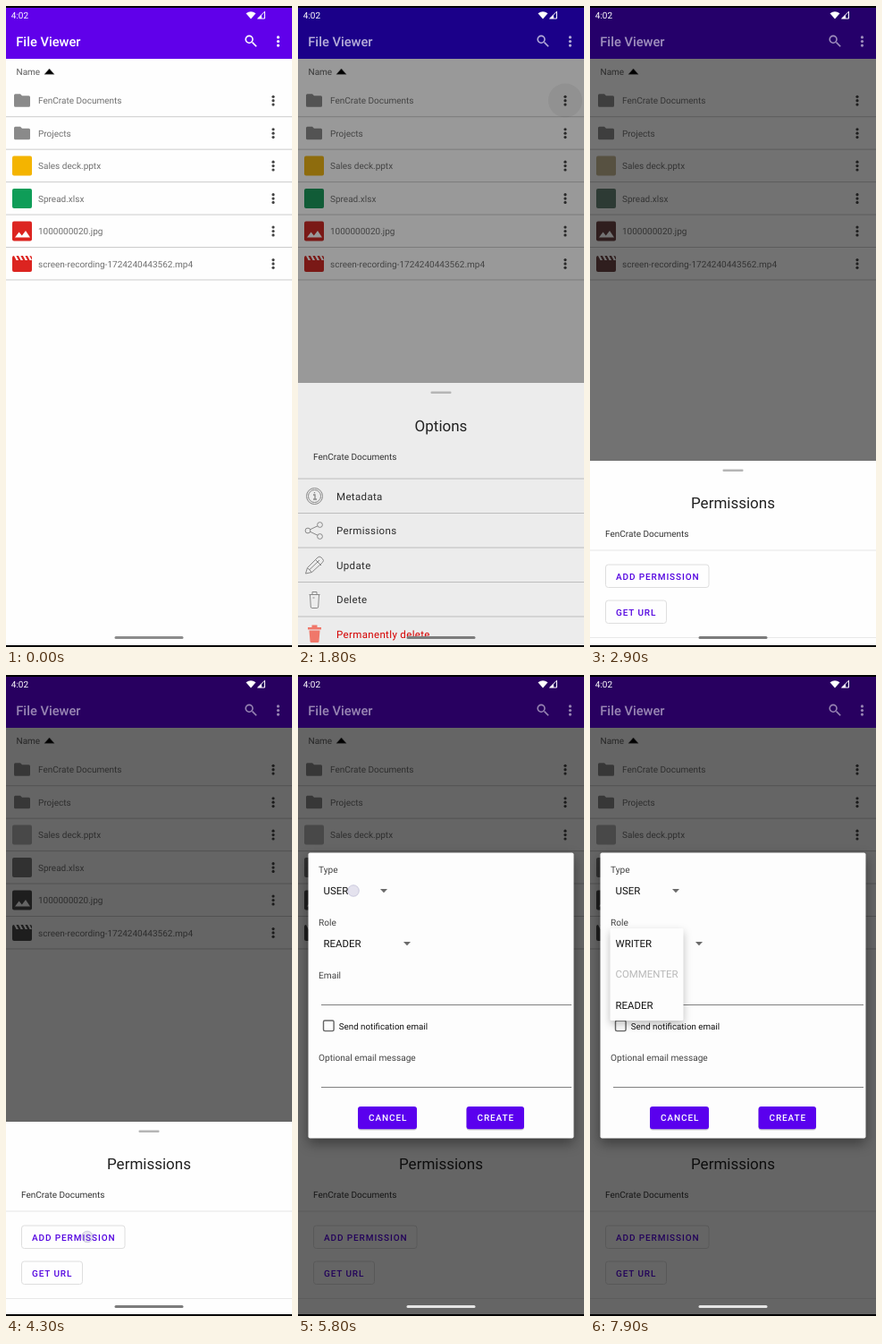
An HTML page that plays this animation: 320 px wide and 716 px high, repeating every 8000 ms.

```html
<!DOCTYPE html>
<html lang="en">
<head>
<meta charset="utf-8">
<title>File Viewer</title>
<style>
  html, body { margin: 0; width: 100%; height: 100%; overflow: hidden; background: #000; }
  svg { display: block; width: 100vw; height: 100vh; font-family: Roboto, "Noto Sans", sans-serif; text-rendering: geometricPrecision; }
  .row { font-size: 10px; fill: #707070; }
  .sub { font-size: 10px; fill: #333; }
  .title { font-size: 17px; fill: #222; text-anchor: middle; }
  .item { font-size: 11.5px; letter-spacing: .35px; fill: #2c2c2c; }
  .button { font-size: 10px; font-weight: 500; letter-spacing: .89px; fill: #5200e0; }
  .label { font-size: 10.15px; fill: #444; }
  .choice { font-size: 11.4px; fill: #111; }
  .line { fill: none; stroke: #888; }
  #dialog > rect:first-child { filter: drop-shadow(0 6px 7px rgba(0, 0, 0, .4)); }
  .popup > rect { filter: drop-shadow(0 4px 5px rgba(0, 0, 0, .25)); }
</style>
</head>
<body>
<svg id="stage" viewBox="0 0 320 716" preserveAspectRatio="none"></svg>
<script>
const LOOP = 8000, STEP = 100;
const FOLDER_NAME = 'FenCrate Documents';

const rect = (x, y, w, h, fill, more = '') =>
  `<rect x="${x}" y="${y}" width="${w}" height="${h}" fill="${fill}" ${more}/>`;
const text = (x, y, label, cls, more = '') => `<text x="${x}" y="${y}" class="${cls}" ${more}>${label}</text>`;
const path = (d, more = '') => `<path d="${d}" ${more}/>`;
const group = (id, content, more = '') => `<g id="${id}" ${more}>${content}</g>`;
const at = (x, y, content) => `<g transform="translate(${x} ${y})">${content}</g>`;
const dots = (x, y, fill, gap) =>
  [-gap, 0, gap].map(d => `<circle cx="${x}" cy="${y + d}" r="1.6" fill="${fill}"/>`).join('');

// File icons, centred on the origin
const square = color => rect(-11, -11, 22, 22, color, 'rx="2"');
const folder = path('M-7.5-7.5h5.5l2 2h7.5q1.5 0 1.5 1.5v9.5q0 1.5-1.5 1.5h-15q-1.5 0-1.5-1.5v-11.5q0-1.5 1.5-1.5z', 'fill="#8a8a8a"');
const picture = square('#dc2420') + path('M-8 7l4.6-6 3.2 4 4.2-5.5 5 7.5z', 'fill="#fff"');
const movie = rect(-11, -9, 22, 18, '#dc2420', 'rx="2"') +
  [-9, -4, 1, 6].map(x => path(`M${x}-9h2.4l2.6 5h-2.4z`, 'fill="#fff"')).join('');

const files = [
  [FOLDER_NAME, folder],
  ['Projects', folder],
  ['Sales deck.pptx', square('#f4b400')],
  ['Spread.xlsx', square('#0f9d58')],
  ['1000000020.jpg', picture],
  ['screen-recording-1724240443562.mp4', movie]
];
const rowY = i => 105.7 + i * 36.45;

const list = rect(0, 59, 320, 655, '#fefefe') +
  text(11.5, 77, 'Name', 'row', 'style="fill:#5c5c5c"') +
  path('M43 76.3L48.5 70 54 76.3z', 'stroke="#777" stroke-width=".6"') +
  files.map(([name, icon], i) =>
    text(36, rowY(i) + 3.7, name, 'row') + dots(299, rowY(i), '#444', 4.4) +
    rect(0, rowY(i) + 17.5, 320, 1, '#ccc')).join('') +
  group('icons', files.map(([, icon], i) => at(18, rowY(i), icon)).join(''));

const header = rect(0, 2, 320, 57, '#6000ea', 'id="bar"') +
  group('barContent',
    text(11.3, 44.8, 'File Viewer', '', 'font-size="14.7" font-weight="500" fill="#fff"') +
    path('M275.6 40.6l4.6 4.6M276 37.3a3.9 3.9 0 1 1-7.8 0a3.9 3.9 0 1 1 7.8 0', 'fill="none" stroke="#fff" stroke-width="1.6"') +
    dots(304.5, 39.5, '#fff', 4.6)) +
  text(5.8, 14.4, '4:02', '', 'font-size="10" fill="#fff"') +
  path('M268.5 8.3Q274 4.3 279.5 8.3L274 14.6z', 'fill="#fff"') +
  path('M281.6 14L289.5 6.2V14z', 'fill="none" stroke="#fff"') +
  path('M281.6 14L286 9.8V14z', 'fill="#fff"');

const bin = path('M-6-5.5h12M-5-5l.8 13q0 1.5 1.5 1.5h5.4q1.5 0 1.5-1.5l.8-13M-2.5-6v-2.5h5v2.5M-2-2h2');
const info = '<circle r="9"/><circle r="7"/>' + path('M-1.5-1.5h2v5m-2 0h4M0-4.6v1.4', 'stroke-width="1.3"');
const share = [[-7.5, 0], [6, -6.5], [6, 6.5]].map(([x, y]) => `<circle cx="${x}" cy="${y}" r="2.9"/>`).join('') +
  path('M-5-1.2l8.4-4M-5 1.2l8.4 4');
const pencil = path('M-10 9.5l2-6.5L3.5-8.5q2-2 4 0l1.5 1.5q2 2 0 4L-3 8zM-8 3l5 5M1-6l6.5 6.5M-5.5 5L5.5-5.5');
const redBin = path('M-7.5-7.5h4.5v-2.5h6v2.5h4.5v2.5h-15zM-6-4h12l-1 12q0 1.5-1.5 1.5h-7q-1.5 0-1.5-1.5z', 'fill="#f0776a" stroke="none"');

const handle = rect(148.5, 9.6, 23, 2.4, '#b5b5b5', 'rx="1"');
const options = rect(0, 0, 320, 320, '#ececec') + handle +
  text(160, 53.5, 'Options', 'title') + text(17, 86, FOLDER_NAME, 'sub') +
  [['Metadata', info], ['Permissions', share], ['Update', pencil], ['Delete', bin], ['Permanently delete', redBin]]
    .map(([name, icon], i) => {
      const y = 126.5 + i * 38.5;
      return rect(0, y - 20, 320, 1, '#bdbdbd') + at(18.5, y, `<g class="line">${icon}</g>`) +
        text(43, y + 4.2, name, 'item', i === 4 ? 'style="fill:#d50000"' : '');
    }).join('');

const outlined = (y, w, name) =>
  rect(17.5, y, w, 25.5, 'none', 'rx="3" stroke="#dedede"') + text(29, y + 16.5, name, 'button');
const permissions = rect(0, 0, 320, 240, '#fefefe') + handle +
  text(160, 52.5, 'Permissions', 'title') + text(17, 85.3, FOLDER_NAME, 'sub') +
  rect(0, 99.5, 320, 1, '#e8e8e8') + rect(0, 197, 320, 1, '#e8e8e8') +
  rect(17, 116, 116.5, 26, '#5200e0', 'id="press" rx="3"') +
  outlined(116, 115.5, 'ADD PERMISSION') + outlined(156, 68, 'GET URL') +
  rect(0, 0, 320, 240, '#000', 'id="sheetShade"');

const spinner = (y, name, arrowX) => text(28.6, y + 4.1, name, 'choice') +
  path(`M${arrowX - 4} ${y - 2}h8l-4 4.2z`, 'fill="#6a6a6a"');
const filled = (x, w, name) =>
  rect(x, 483, w, 25.5, '#000', 'rx="3" opacity=".2"') + rect(x, 482, w, 25.3, '#5a00ee', 'rx="3"') +
  text(x + 12, 498.4, name, 'button', 'style="fill:#fff"');
const dialog = rect(11.5, 198.5, 297, 319, '#fdfdfd', 'rx="2"') +
  text(23, 220.8, 'Type', 'label') + spinner(241, 'USER', 96) +
  text(23, 280, 'Role', 'label') + spinner(300, 'READER', 122) +
  text(23, 339.4, 'Email', 'label') + rect(26, 368, 280, 1, '#808080') +
  rect(28.5, 386, 11.6, 11.6, 'none', 'rx="1.5" stroke="#666" stroke-width="1.4"') +
  text(45.8, 395.5, 'Send notification email', '', 'font-size="9.75" fill="#111"') +
  text(23, 431, 'Optional email message', 'label') + rect(26, 460, 280, 1, '#808080') +
  filled(67, 66, 'CANCEL') + filled(188.5, 64.5, 'CREATE');

const popup = (id, y, w, names, disabled) => group(id,
  rect(22.5, y, w, names.length * 34.3, '#fdfdfd', 'rx="1.5"') +
  names.map((name, i) => text(28.6, y + 21.1 + i * 34.3, name, 'choice',
    disabled.includes(name) ? 'style="fill:#b8b8b8"' : '')).join(''), 'class="popup"');

const stage = document.getElementById('stage');
stage.innerHTML =
  list + rect(0, 59, 320, 655, '#000', 'id="shade"') + header +
  '<circle id="ripple" cx="299" cy="105.5"/>' +
  group('options', options) + group('permissions', permissions) + group('dialog', dialog) +
  popup('typePopup', 224, 56, ['USER', 'GROUP', 'DOMAIN', 'ANYONE'], ['DOMAIN', 'ANYONE']) +
  popup('rolePopup', 283, 82, ['WRITER', 'COMMENTER', 'READER'], ['COMMENTER']) +
  '<circle id="touch" r="6.3"/>' +
  rect(121.5, 704, 77, 3, '#888', 'id="pill" rx="1.5"') +
  rect(0, 0, 320, 2, '#000') + rect(0, 714, 320, 2, '#000');

const el = {};
stage.querySelectorAll('[id]').forEach(node => el[node.id] = node);
const set = (id, attrs) => { for (const name in attrs) el[id].setAttribute(name, attrs[name]); };

// Piecewise linear value through [time, value] stops
function track(t, ...stops) {
  if (t <= stops[0][0]) return stops[0][1];
  for (let i = 1; i < stops.length; i++) {
    const [t0, a] = stops[i - 1], [t1, b] = stops[i];
    if (t < t1) return a + (b - a) * (t - t0) / (t1 - t0);
  }
  return stops[stops.length - 1][1];
}

const fade = (id, value) => set(id, { opacity: value, visibility: value > 0 ? 'visible' : 'hidden' });
const slide = (id, y) => set(id, { transform: `translate(0 ${y})` });

const touches = [
  { from: 1200, to: 1400, x: 299, y: 105 },
  { from: 2500, to: 2700, x: 72, y: 553, fill: '#fff', stroke: '#ddd' },
  { from: 4300, to: 4500, x: 91, y: 627.5 },
  { from: 5800, to: 6000, x: 62, y: 241 },
  { from: 6400, to: 6800, x: 178, y: 262.5, fill: 'none', stroke: '#b5c8f0' },
  { from: 7100, to: 7300, x: 74, y: 300 }
];

function draw(t) {
  const shade = track(t, [1200, 0], [1500, .25], [1800, .4], [2600, .4], [3000, .6]);
  fade('shade', shade);
  const red = track(t, [1200, 96], [1500, 42], [1800, 27], [2600, 27], [3000, 40]);
  const blue = track(t, [1200, 234], [1500, 176], [1800, 137], [2600, 137], [3000, 96]);
  set('bar', { fill: `rgb(${red},0,${blue})` });
  set('barContent', { opacity: 1 - shade * .8 });
  el.icons.style.filter = `grayscale(${track(t, [1500, 0], [2000, .2], [2600, .2], [3000, 1])})`;

  set('ripple', { r: track(t, [1200, 7], [1500, 19]) });
  fade('ripple', t < 1200 ? 0 : track(t, [1500, .14], [2000, 0]));

  slide('options', track(t, [1200, 716], [1300, 620], [1400, 480], [1500, 433], [1600, 424], [1700, 421],
    [2600, 421], [2700, 500], [2800, 640], [2900, 716]));
  slide('permissions', track(t, [2600, 716], [2700, 650], [2800, 550], [2900, 508], [3000, 499]));
  fade('press', t < 4400 ? 0 : track(t, [4400, .12], [4800, .18], [5100, 0]));

  const open = track(t, [4400, 0], [4700, 1]);
  fade('sheetShade', open * .6);
  fade('dialog', open);
  fade('typePopup', track(t, [5800, 0], [6100, 1], [6500, 1], [6600, .75], [6800, 0]));
  fade('rolePopup', track(t, [7200, 0], [7500, 1]));

  const tap = touches.find(s => t >= s.from && t < s.to);
  fade('touch', tap ? .8 : 0);
  if (tap) set('touch', {
    cx: tap.x, cy: tap.y,
    fill: tap.fill || 'rgba(150,140,190,.3)', stroke: tap.stroke || 'rgba(150,150,190,.5)'
  });
  set('pill', { fill: t < 1300 ? '#8c8c8c' : t < 4500 ? '#7c7c7c' : t < 5500 ? '#a8a8a8' : '#e4e4e4' });
}

const start = performance.now();
function tick() {
  const t = (performance.now() - start) % LOOP;
  draw(Math.floor(t / STEP) * STEP);
  requestAnimationFrame(tick);
}
tick();
</script>
</body>
</html>
```
